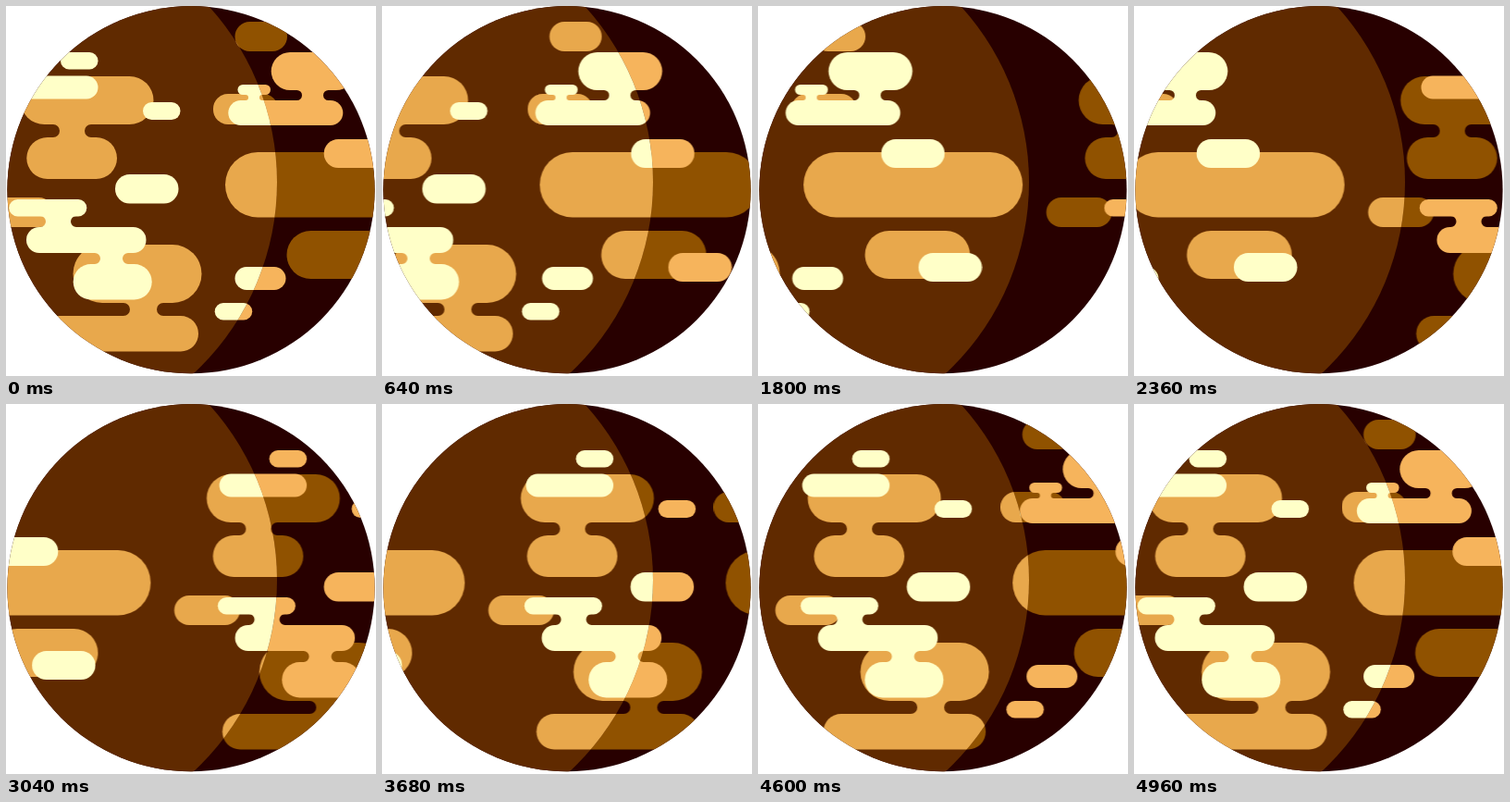
Write an HTML page without scripts that moves like this. It is 400 by 400 pixels and loops after 5000 ms.

```html
<!DOCTYPE html>
<html lang="en">
<head>
<meta charset="utf-8">
<title>Turning planet</title>
<style>
  html, body { margin: 0; width: 100%; height: 100%; overflow: hidden; background: #fff; }
  svg { display: block; width: 100%; height: 100%; }

  .night { --ground: #280000; --low: #905200; --high: #f6b45c; }
  .day { --ground: #602a00; --low: #e8a84c; --high: #ffffc8; }

  .ground { fill: var(--ground); }
  .low { fill: var(--low); animation: drift-low 5s linear infinite; }
  .high { fill: var(--high); animation: drift-high 5s linear infinite; }

  /* One turn takes 124 of 125 steps; the last step rests near the start pose. */
  @keyframes drift-low {
    0%, .12% { transform: translateX(0); }
    99.32%, 100% { transform: translateX(-519px); }
  }
  @keyframes drift-high {
    0%, .12% { transform: translateX(0); }
    99.32%, 100% { transform: translateX(-581.5px); }
  }
</style>
</head>
<body>
<svg viewBox="0 0 400 400">
  <defs>
    <clipPath id="disc"><circle cx="200" cy="198.7" r="198.6"/></clipPath>
    <clipPath id="sunlit"><circle cx="11" cy="190.5" r="282"/></clipPath>

    <g id="lowClouds">
      <rect x="247.5" y="17" width="56.5" height="32" rx="16"/>
      <rect x="237" y="158" width="237" height="70.5" rx="35.2"/>
      <rect x="303.5" y="243" width="113.5" height="52" rx="26"/>
      <rect x="224" y="95" width="70" height="33" rx="16"/>
      <rect x="-19.5" y="207" width="71" height="32" rx="16"/>

      <rect x="15.5" y="76" width="144" height="52" rx="26"/>
      <path d="M51 128a7 7 0 0 1 0 14H92a7 7 0 0 1 0-14z"/>
      <rect x="22.3" y="142" width="97.7" height="45" rx="22.5"/>

      <rect x="72.5" y="258" width="139" height="63" rx="31.5"/>
      <path d="M127 321a7 7 0 0 1 0 14H170a7 7 0 0 1 0-14z"/>
      <rect x="32.5" y="335" width="175.5" height="38.5" rx="19.2"/>
    </g>

    <g id="highClouds">
      <rect x="59" y="50" width="40.5" height="18.5" rx="9.2"/>
      <rect x="5" y="75.5" width="94.5" height="25" rx="12.5"/>
      <rect x="148" y="104" width="40.5" height="19" rx="9.5"/>
      <rect x="118" y="182" width="68.5" height="31.5" rx="15.7"/>
      <rect x="343.7" y="144" width="68.5" height="31" rx="15.5"/>
      <rect x="247.5" y="282" width="55" height="25" rx="12.5"/>
      <rect x="225.7" y="321" width="40.5" height="18.5" rx="9.2"/>
      <rect x="384" y="267" width="68.5" height="31" rx="15.5"/>

      <rect x="3.3" y="209" width="84" height="18.5" rx="9.2"/>
      <path d="M37 227a6 6 0 0 1 0 12H76a6 6 0 0 1 0-12z"/>
      <rect x="22" y="239" width="129.5" height="28" rx="14"/>
      <path d="M96 267a6 6 0 0 1 0 12H132a6 6 0 0 1 0-12z"/>
      <rect x="72.7" y="279" width="85" height="38.5" rx="19.2"/>

      <rect x="286.7" y="50" width="90.7" height="41" rx="20.5"/>
      <path d="M314.5 91a5.5 5.5 0 0 1 0 11H348.5a5.5 5.5 0 0 1 0-11z"/>
      <rect x="240.3" y="102" width="124" height="27" rx="13.5"/>
      <path d="M259 96a3 3 0 0 1 0 6H277a3 3 0 0 1 0-6z"/>
      <rect x="250.5" y="85" width="35.5" height="11" rx="5.5"/>
    </g>

    <!-- Each layer twice, one turn apart, so it wraps without a gap. -->
    <g id="lowLayer">
      <use href="#lowClouds"/>
      <use href="#lowClouds" x="519"/>
    </g>
    <g id="highLayer">
      <use href="#highClouds"/>
      <use href="#highClouds" x="581.5"/>
    </g>
  </defs>

  <g clip-path="url(#disc)">
    <g class="night">
      <rect class="ground" width="400" height="400"/>
      <g class="low"><use href="#lowLayer"/></g>
      <g class="high"><use href="#highLayer"/></g>
    </g>
    <g class="day" clip-path="url(#sunlit)">
      <rect class="ground" width="400" height="400"/>
      <g class="low"><use href="#lowLayer"/></g>
      <g class="high"><use href="#highLayer"/></g>
    </g>
  </g>
</svg>
</body>
</html>
```
